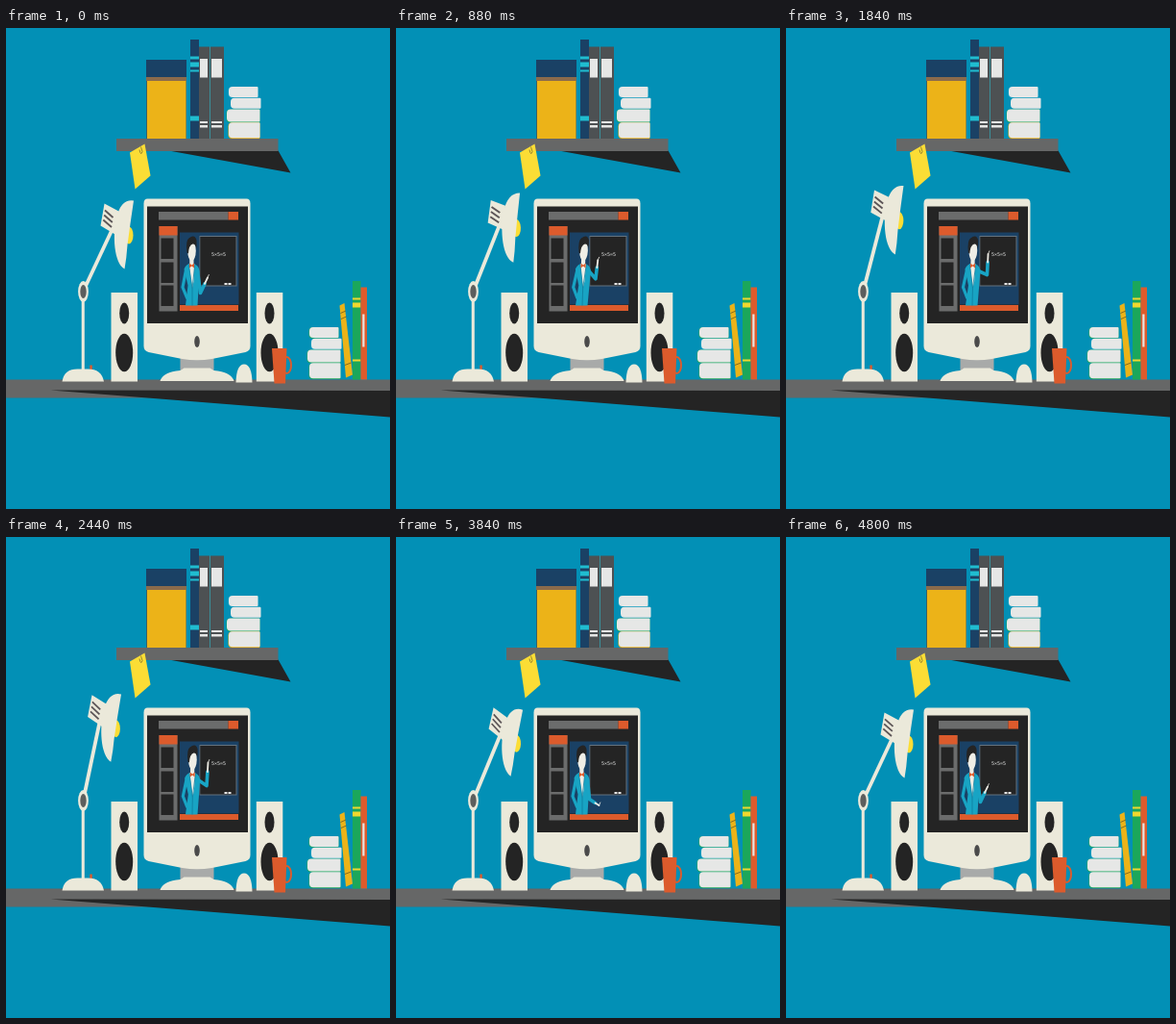
These frames come from a looping animation (400 by 500 pixels, 4.84 s). An HTML page with a canvas:

```html
<!DOCTYPE html>
<html lang="en">
<head>
<meta charset="utf-8">
<title>Desk lesson</title>
<style>
html, body { margin: 0; width: 100%; height: 100%; overflow: hidden; background: #0290b6; }
canvas { display: block; width: 400px; height: 500px; }
</style>
</head>
<body>
<canvas id="stage" width="400" height="500"></canvas>
<script>
const ctx = document.getElementById('stage').getContext('2d');
const LOOP = 4840, STEP = 40;
const C = {
  bg: '#0290b6', cream: '#ebe9da', grey: '#666767', dark: '#242424', navy: '#1a4165',
  orange: '#dc5b2c', yellow: '#fbdd35', amber: '#ecb318', cyan: '#18a4c4', white: '#e6e7e6',
  green: '#1ba75b', slate: '#4d5153', skin: '#f0eee6'
};

// time, lamp arm angle, shade tilt, hand x, hand y, elbow x, elbow y, lean
const POSES = [
  [0, 46.8, 0, 210.5, 260, 203, 276, 0],
  [480, 48, -3.5, 210.5, 247, 206.5, 267, 2],
  [1240, 55.2, -4, 211, 239, 209.5, 258, 2],
  [2440, 67.2, 2, 211, 235, 209.5, 259, 1],
  [3160, 55.2, 6, 210.5, 249, 206.5, 268, 1],
  [3840, 50.3, 5, 212, 279.5, 202, 273, 0],
  [4840, 46.8, 0, 210.5, 260, 203, 276, 0]
];

function slope(i, k) {
  if (i === 0 || i === POSES.length - 1) return 0;
  const a = POSES[i - 1], b = POSES[i + 1];
  return (b[k] - a[k]) / (b[0] - a[0]);
}

function poseAt(t) {
  let i = 0;
  while (i < POSES.length - 2 && t >= POSES[i + 1][0]) i++;
  const a = POSES[i], b = POSES[i + 1], d = b[0] - a[0], u = (t - a[0]) / d;
  const h = u * u * (3 - 2 * u);
  return a.map((v, k) => v + (b[k] - v) * h +
    d * u * (1 - u) * ((1 - u) * slope(i, k) - u * slope(i + 1, k)));
}

function rect(color, x, y, x2, y2, r = 0) {
  ctx.fillStyle = color;
  ctx.beginPath();
  ctx.roundRect(x, y, x2 - x, y2 - y, r);
  ctx.fill();
}

function oval(color, x, y, rx, ry) {
  ctx.fillStyle = color;
  ctx.beginPath();
  ctx.ellipse(x, y, rx, ry, 0, 0, 7);
  ctx.fill();
}

function shape(color, d) {
  ctx.fillStyle = color;
  ctx.fill(new Path2D(d));
}

function line(color, width, d, cap = 'butt') {
  ctx.strokeStyle = color;
  ctx.lineWidth = width;
  ctx.lineCap = cap;
  ctx.lineJoin = 'round';
  ctx.stroke(new Path2D(d));
}

function pile(x, y, edges) {
  const books = [[2, 0, 33, 11.7], [4, 11.7, 36, 23.5], [0, 23.5, 35, 37.2], [2, 37.2, 35, 54]];
  books.forEach(([l, t, r, b], i) => {
    rect(edges[i], x + l, y + t, x + r, y + b, [4, 1, 1, 4]);
    rect(C.white, x + l + 0.5, y + t, x + r, y + b - 0.8, [4, 1, 1, 4]);
  });
}

function shelf() {
  shape(C.dark, 'M170 128 L284 128 L297 151 Z');
  rect(C.grey, 115.5, 115.5, 284, 128.5);

  rect(C.navy, 146.5, 33.5, 188.5, 51.5);
  rect('#8b6b4b', 146.5, 51.5, 188.5, 55.5);
  rect('#37616b', 146.5, 55.5, 188.5, 115.5);
  rect(C.amber, 147.5, 55.5, 188, 115.5);

  rect(C.navy, 192.5, 12.5, 201.5, 115.5);
  for (const [a, b] of [[30, 33], [36, 41], [44, 46], [92, 97]]) rect('#20bdd0', 192.5, a, 201.5, b);
  for (const [x, x2] of [[201.5, 212.5], [213.5, 227.5]]) {
    rect(C.slate, x, 20, x2, 115.5);
    rect(C.white, x + 1, 32.5, x2 - 2, 52);
    rect(C.white, x + 1, 97.5, x2 - 2, 99.5);
    rect(C.white, x + 1, 101.5, x2 - 2, 104);
  }
  rect('#3a8f9a', 212.5, 20, 213.5, 115.5);
  pile(230, 61.5, [C.cyan, C.bg, C.green, C.amber]);

  shape(C.yellow, 'M129.5 130 L145 121 L151 154 L135 168 Z');
  line('#8c7c33', 0.9, 'M139.5 127 Q141 134 142.5 129 L141 124');
}

function desk() {
  shape(C.grey, 'M0 366 H401 V379 L140 385 H0 Z');
  shape(C.dark, 'M47 377 L401 377.5 V405 Z');
}

function speaker(x) {
  rect(C.cream, x, 275.5, x + 27.5, 368);
  oval(C.dark, x + 13.7, 297, 5, 11);
  oval(C.dark, x + 13.7, 338, 9, 19.7);
}

function computer() {
  rect('#a8aaa9', 182, 338, 217, 358);
  shape(C.cream, 'M161 367.5 Q164 358 182 356.5 L186 354 H213 L217 356.5 Q235 358 238 367.5 Z');
  shape(C.cream, 'M144 183 Q144 178 148 178 H251 Q255 178 255 183 V331 Q255 336 250 337.5 ' +
    'L215 344.5 Q199.5 347 184 344.5 L149 337.5 Q144 336 144 331 Z');
  rect(C.dark, 147.5, 186, 252.5, 307.5);
  oval('#4b4b4b', 199.5, 326.5, 2.8, 6);

  rect('#6b6c6c', 159.5, 191.5, 232, 200);
  rect(C.orange, 232, 191.5, 242.5, 200);
  rect('#6b6c6c', 160, 206.5, 179, 295);
  rect(C.orange, 160, 206.5, 179, 216);
  for (const y of [219, 244, 268]) rect(C.dark, 162, y, 175, y + 21.5);
  rect(C.navy, 181.5, 213, 243, 288);
  rect(C.orange, 181.5, 288.5, 242.5, 294.5);

  rect('#65737f', 202, 216.5, 241, 269);
  rect(C.dark, 202.8, 217.5, 240, 268);
  rect(C.white, 228, 265.5, 231, 267.5);
  rect(C.white, 232, 265.5, 235, 267.5);
  ctx.fillStyle = C.white;
  ctx.font = '5px "DejaVu Sans Mono", monospace';
  ctx.fillText('5×5=5', 214.5, 237.5);
}

function teacher([, , , hx, hy, ex, ey, lean]) {
  ctx.save();
  // The lean shears the body over its fixed waist.
  ctx.transform(1, 0, -lean / 60, 1, lean * 289 / 60, 0);
  line(C.cyan, 3.2, 'M188 252 L184.5 270 L189 281', 'round');
  shape(C.cyan, 'M186 251 Q188 246 193 245 L197 246 Q202 248 202 254 L200 289 H187.5 L190 268 Z');
  shape(C.skin, 'M191 246 H197 L196 264 L194.5 271 Z');
  line('#107d9f', 0.8, 'M190.8 246 L194.5 271 L197.3 246 M194.5 271 V289');
  rect(C.skin, 191.8, 238, 196, 247);
  oval(C.skin, 194, 232, 4.3, 10.5);
  shape(C.dark, 'M189 234 Q187.5 221 191 219 Q197 214 199 221 L199 230 Q198 225 195 225 Q191 226 190.5 235 Z');
  shape(C.orange, 'M191.5 245 L194 247 L196.5 245 V250 L194 248 L191.5 250 Z');
  ctx.restore();

  const sx = 200 + lean * 0.6, wx = ex + (hx - ex) * 0.6, wy = ey + (hy - ey) * 0.6;
  line(C.cyan, 3.6, `M${sx} 253 L${ex} ${ey} L${wx} ${wy}`, 'round');
  line(C.skin, 1.8, `M${wx} ${wy} L${hx} ${hy}`, 'round');
  line(C.skin, 0.8, `M${hx} ${hy} l1.3 -3`, 'round');
}

function lamp([, angle, tilt]) {
  const phi = angle * Math.PI / 180;
  const ax = 81 + 45.3 * Math.cos(phi), ay = 274 - 90.6 * Math.sin(phi);

  rect(C.cream, 79.2, 274, 82.3, 360);
  rect(C.orange, 87.8, 351, 90.3, 358);
  shape(C.cream, 'M59 368 Q61 355 75 355 H86 Q100 355 102.5 368 Z');
  line(C.cream, 3.8, `M81 274 L${ax} ${ay}`);
  oval(C.cream, 81, 274.5, 5.4, 11);
  oval('#5d5e5d', 81, 274.5, 3.2, 7);

  // The whole scene is drawn twice as tall, so the shade turns in squashed space.
  ctx.save();
  ctx.translate(ax, ay);
  ctx.scale(1, 2);
  ctx.rotate(tilt * Math.PI / 180);
  ctx.scale(1, 0.5);
  ctx.translate(-112, -208);
  oval(C.yellow, 128.5, 216, 4.5, 9);
  shape(C.cream, 'M103 183 L118 191 L114 215 L99 206 Z');
  line('#5c5557', 1.8, 'M103.5 190 L112 197.5 M102.7 195 L111.3 202.5 M101.8 200 L110.5 207.5');
  shape(C.cream, 'M133.5 180 Q121 178 116 196 C111 216 113 245 124 251 Q126 240 127 226 Q130 203 133.5 180 Z');
  ctx.restore();
}

function deskItems() {
  shape(C.cream, 'M240 369 Q240.5 350 248.5 350 Q256.5 350 257 369 Z');
  ctx.strokeStyle = C.orange;
  ctx.lineWidth = 2;
  ctx.beginPath();
  ctx.ellipse(293, 351, 4.5, 8.5, 0, 0, 7);
  ctx.stroke();
  shape(C.orange, 'M277.5 333.5 H293 L291.5 370 H280 Z');

  pile(314, 311.5, [C.green, C.cyan, C.green, C.green]);
  shape(C.amber, 'M348 289 L353 286.5 L361.5 361 L354.5 364 Z');
  line('#6c5a20', 0.8, 'M349 297 L354.5 294.5 M349.5 303 L355 300.5 M353.3 351 L360 348.5');
  rect(C.green, 361.5, 263.5, 370, 366);
  for (const [a, b] of [[281, 283], [286, 291], [345, 347]]) rect('#f2d72f', 361.5, a, 370, b);
  rect(C.orange, 370, 270, 376.5, 366);
  rect(C.white, 371.8, 298, 374, 332);
}

function draw(now) {
  const pose = poseAt(Math.floor((now % LOOP) / STEP) * STEP);
  rect(C.bg, 0, 0, 400, 500);
  ctx.save();
  ctx.translate(-0.5, -0.5);
  shelf();
  desk();
  speaker(110);
  speaker(261.3);
  computer();
  teacher(pose);
  lamp(pose);
  deskItems();
  ctx.restore();
  requestAnimationFrame(draw);
}
requestAnimationFrame(draw);
</script>
</body>
</html>
```
